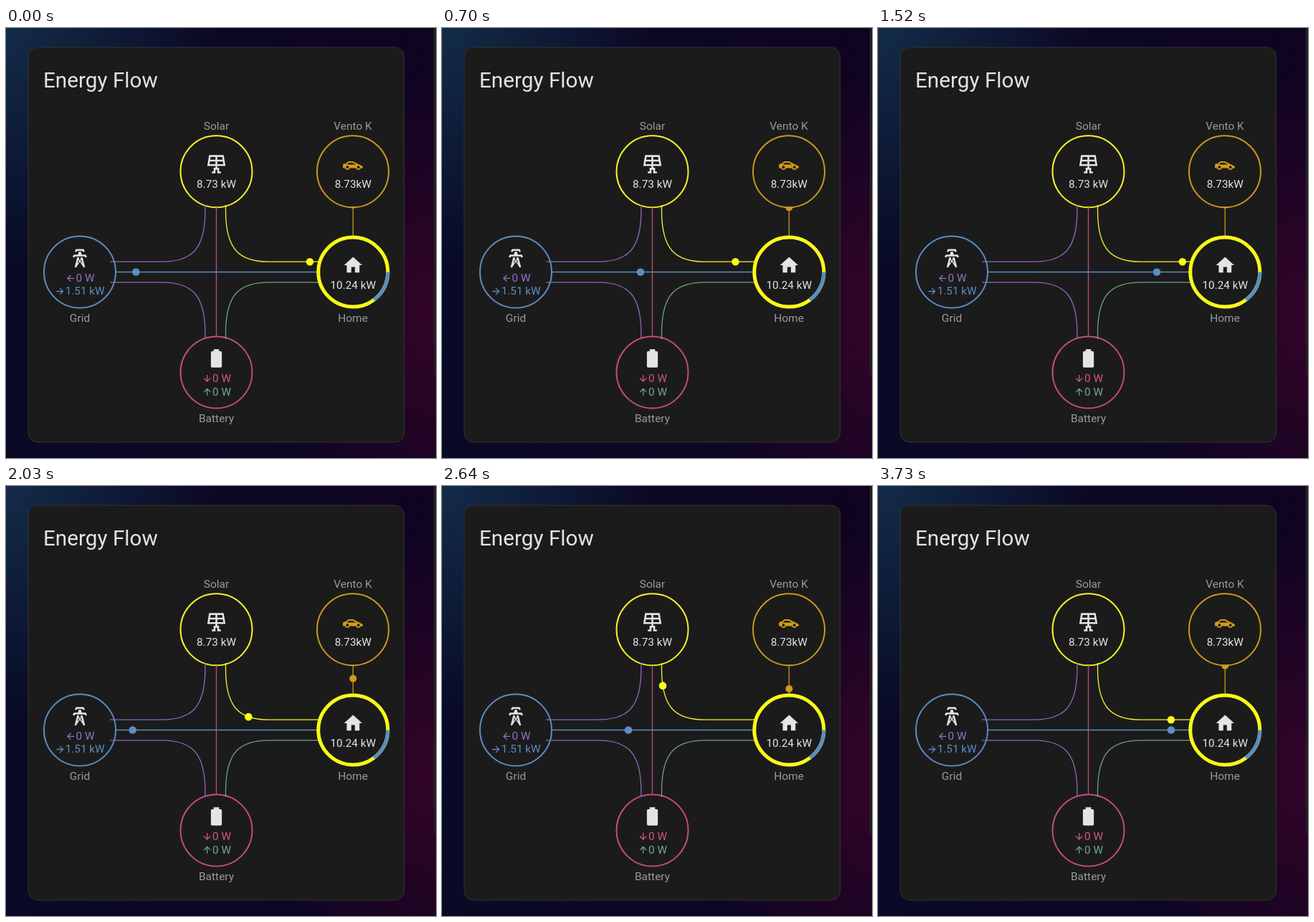
Recreate the animation shown at these times as an HTML page. Size 600 px wide and 600 px high, loop 3760 ms.

```html
<!DOCTYPE html>
<html lang="en">
<head>
<meta charset="utf-8">
<title>Energy Flow</title>
<style>
  html, body { margin: 0; width: 100%; height: 100%; overflow: hidden; background: #0a0720; }
  body {
    background:
      radial-gradient(300px 330px at 0 0, #132c48 0%, rgba(19, 44, 72, 0) 100%),
      radial-gradient(260px 330px at 620px 400px, #35042a 0%, rgba(53, 4, 42, 0) 100%),
      linear-gradient(90deg, #080a26, #0c0724 50%, #100420);
  }
  svg { display: block; width: 100vw; height: 100vh; }
  text { font: 15.3px Roboto, sans-serif; fill: #e4e4e4; }
  .mid { text-anchor: middle; }
  .label { fill: #9a9a9a; font-size: 15.5px; text-anchor: middle; }
  .title { font-size: 29.7px; }
  .line { fill: none; stroke-width: 1.3; }
  .ring { fill: none; stroke-width: 2; }
  .icon { fill: #e4e4e4; }
  .solar { stroke: #f4f42a; }
  .car { stroke: #c8991c; }
  .grid { stroke: #5a8ec2; }
  .back { stroke: #8b69b8; }
  .store { stroke: #c34b80; }
  .drain { stroke: #6ba18c; }
  .f-car { fill: #d09c18; }
  .f-grid { fill: #5a8ec2; }
  .f-back { fill: #9270c4; }
  .f-store { fill: #d0548a; }
  .f-drain { fill: #70a892; }
</style>
</head>
<body>
<svg viewBox="0 0 600 600">
  <defs>
    <path id="bend" d="M14.3 -93.5V-85.5C14.3 -30.5 34 -14.3 75 -14.3H147"/>
    <path id="arrow" d="M8 -1V1H-4L1.5 6.5L.08 7.92L-7.84 0L.08 -7.92L1.5 -6.5L-4 -1Z"/>
    <clipPath id="gap"><rect x="470" y="249.5" width="30" height="45"/></clipPath>
  </defs>

  <rect x="597.5" y="-20" width="30" height="511" rx="12" fill="#1c1b1c" stroke="#2c2a30"/>
  <rect x="31" y="27" width="524.5" height="551" rx="13" fill="#1c1b1c" stroke="#333234"/>
  <text class="title" x="52" y="83">Energy Flow</text>

  <!-- Rings -->
  <circle class="ring solar" cx="293.5" cy="200.3" r="50"/>
  <circle class="ring car" cx="484" cy="200.3" r="50"/>
  <circle class="ring grid" cx="103" cy="340.5" r="50"/>
  <circle class="ring store" cx="293.5" cy="480.5" r="50"/>

  <!-- Connections -->
  <g class="line" transform="translate(292.2 340.5)">
    <use href="#bend" class="back" transform="scale(-1 1)"/>
    <use href="#bend" class="back" transform="scale(-1)"/>
    <use href="#bend" class="drain" transform="scale(1 -1)"/>
    <use href="#bend" class="solar"/>
  </g>
  <path class="line store" d="M293.5 250V430.5"/>
  <path class="line grid" d="M153 340.5H436"/>
  <path class="line car" d="M484.3 250V292"/>

  <!-- Moving dots -->
  <circle id="gridDot" class="f-grid" r="5.3" cy="340.5"/>
  <circle id="solarDot" fill="#fdfd1e" r="5.3"/>
  <g clip-path="url(#gap)"><circle id="carDot" class="f-car" r="5" cx="484.3"/></g>

  <!-- Home ring, split by supply -->
  <g transform="translate(484.3 340.5)" fill="none" stroke-width="5">
    <circle r="48.5" fill="#1c1b1c" stroke="#f8fb18"/>
    <circle r="48.5" class="grid" pathLength="100" stroke-dasharray="14.75 85.25"/>
  </g>

  <!-- Icons -->
  <g class="icon">
    <path transform="translate(278.3 174.8) scale(1.27)" fill-rule="evenodd" d="M4 2H20L22 14H13V16H15V20H17V22H13V18H11V22H7V20H9V16H11V14H2ZM5.7 4L5.2 7H11V4ZM13 4V7H18.8L18.3 4ZM4.9 9L4.4 12H11V9ZM13 9V12H19.6L19.1 9Z"/>
    <path class="f-car" transform="translate(468.8 175.2) scale(1.27)" fill-rule="evenodd" d="M12 8.5H7L4 11H3C1.9 11 1 11.9 1 13V16H3.2C3.6 17.2 4.7 18 6 18S8.4 17.2 8.8 16H15.2C15.6 17.2 16.7 18 18 18S20.4 17.2 20.8 16H23V15C23 13.9 22 13.5 21 13ZM5.25 12L7.5 10H11.5L15.5 12ZM6 13.5a1.5 1.5 0 0 1 0 3a1.5 1.5 0 0 1 0 -3M18 13.5a1.5 1.5 0 0 1 0 3a1.5 1.5 0 0 1 0 -3"/>
    <path transform="translate(87.8 306) scale(1.27)" fill-rule="evenodd" d="M8.3 5.4L6.5 4.5L7.8 2H16.2L17.5 4.5L15.7 5.4L15 4H9ZM18.6 8H14.1L13.3 5H10.7L9.9 8H5.4L4.1 10.5L5.9 11.4L6.6 10H17.4L18.1 11.4L19.9 10.5ZM17.8 22H15.7L15.5 21.1L12 15.9L8.5 21.1L8.3 22H6.2L9.1 11H11.2L10.8 12.3L12 14.1L13.2 12.3L12.8 11H14.9ZM11.4 15L10.5 13.6L9.3 18.1ZM14.7 18.1L13.5 13.6L12.6 15Z"/>
    <path transform="translate(469.1 315.8) scale(1.27)" d="M10 20V14H14V20H19V12H22L12 3L2 12H5V20Z"/>
    <path transform="translate(278.3 445.8) scale(1.27)" d="M16.7 4H15V2H9V4H7.3A1.3 1.3 0 0 0 6 5.3V20.7A1.3 1.3 0 0 0 7.3 22H16.7A1.3 1.3 0 0 0 18 20.7V5.3A1.3 1.3 0 0 0 16.7 4Z"/>
  </g>
  <use href="#arrow" class="f-back" transform="translate(90 349.3) scale(.635)"/>
  <use href="#arrow" class="f-grid" transform="translate(75.5 367.5) rotate(180) scale(.635)"/>
  <use href="#arrow" class="f-store" transform="translate(280.7 489) rotate(-90) scale(.635)"/>
  <use href="#arrow" class="f-drain" transform="translate(280.7 507.6) rotate(90) scale(.635)"/>

  <!-- Values and labels -->
  <text class="mid" x="293.5" y="222.7">8.73 kW</text>
  <text class="mid" x="484.3" y="222.7">8.73kW</text>
  <text class="mid" x="484.3" y="363.5">10.24 kW</text>
  <text class="f-back" x="97.5" y="354.2">0 W</text>
  <text class="f-grid" x="82.7" y="372.2">1.51 kW</text>
  <text class="f-store" x="288" y="494">0 W</text>
  <text class="f-drain" x="288" y="512.6">0 W</text>
  <text class="label" x="293.5" y="141.6">Solar</text>
  <text class="label" x="484" y="141.6">Vento K</text>
  <text class="label" x="103" y="409.8">Grid</text>
  <text class="label" x="484" y="409.8">Home</text>
  <text class="label" x="293.5" y="549.6">Battery</text>
</svg>
<script>
  const LOOP = 3760;
  const GRID = { period: 2064, phase: 0.1 };
  const SOLAR = { period: 758, phase: 0.8 };

  const $ = id => document.getElementById(id);
  const bend = $('bend'), bendLength = bend.getTotalLength();
  const progress = (flow, t) => (flow.phase + t / flow.period) % 1;

  // Same curve as CSS ease-in-out
  function easeInOut(x) {
    let lo = 0, hi = 1, s = 0.5;
    for (let i = 0; i < 18; i++) {
      const r = 1 - s;
      if (3 * r * r * s * 0.42 + 3 * r * s * s * 0.58 + s * s * s < x) lo = s;
      else hi = s;
      s = (lo + hi) / 2;
    }
    return s * s * (3 - 2 * s);
  }

  function draw(now) {
    const t = now % LOOP;
    $('gridDot').setAttribute('cx', 153 + 282 * progress(GRID, t));

    const f = easeInOut(progress(SOLAR, t));
    const p = bend.getPointAtLength(f * bendLength);
    $('solarDot').setAttribute('cx', 292.2 + p.x);
    $('solarDot').setAttribute('cy', 340.5 + p.y);
    $('carDot').setAttribute('cy', 291 - 48 * f);
  }

  const start = performance.now();
  function tick() {
    draw(performance.now() - start);
    requestAnimationFrame(tick);
  }
  tick();
</script>
</body>
</html>
```
